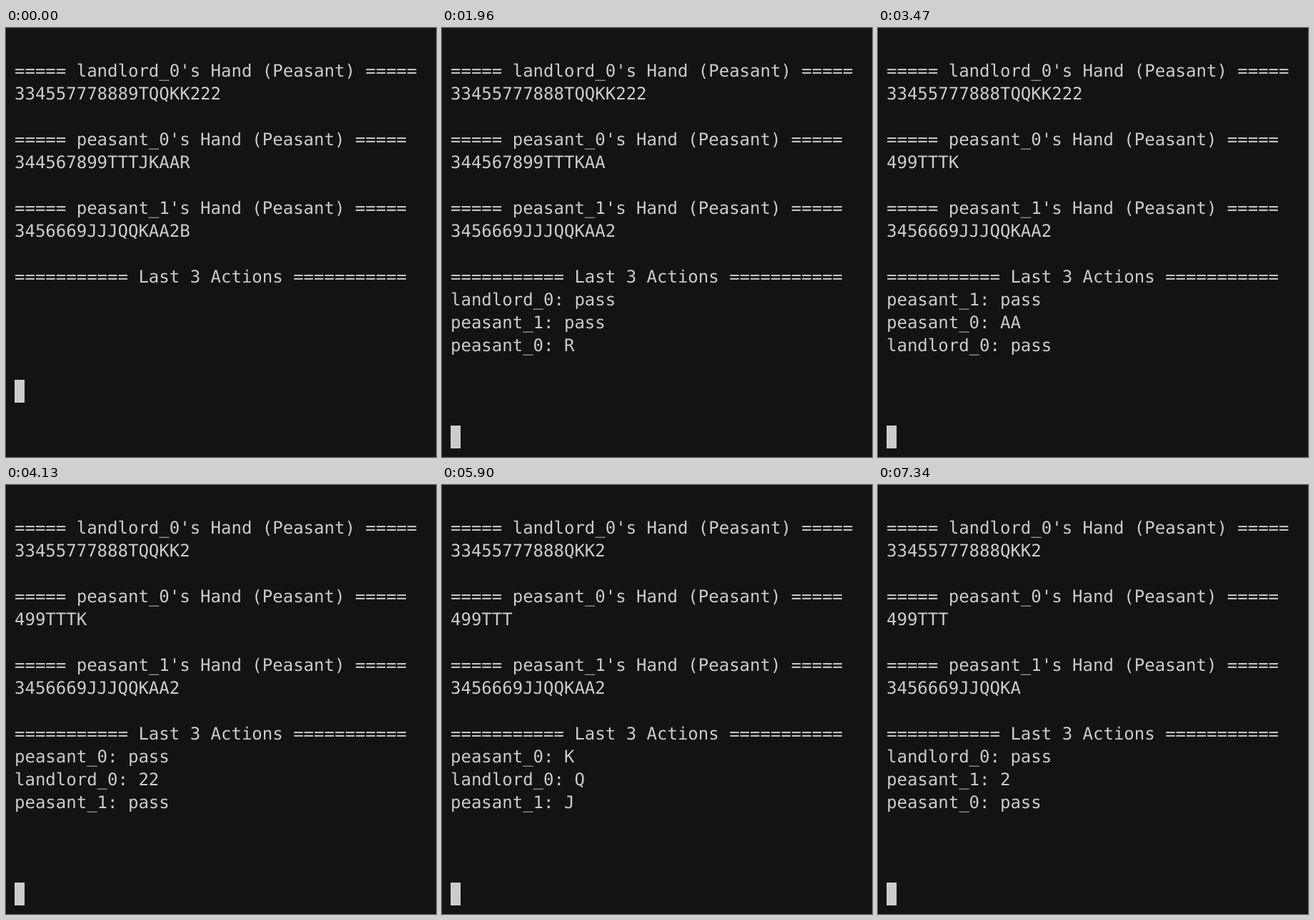
An HTML page for the animation above (8340 ms loop, 602x600 px).

```html
<!DOCTYPE html>
<html lang="en">
<head>
<meta charset="utf-8">
<title>Card game in a terminal</title>
<style>
  html, body {
    margin: 0;
    width: 100%;
    height: 100%;
    overflow: hidden;
    background: #121314;
  }
  #screen {
    position: absolute;
    left: 12px;
    top: 12px;
    margin: 0;
    color: #ccc;
    font: 24px/32px "DejaVu Sans Mono", monospace;
    font-variant-ligatures: none;
    text-rendering: geometricPrecision;
    white-space: pre;
  }
  #cursor {
    position: absolute;
    left: 12px;
    width: 14px;
    height: 32px;
    background: #ccc;
  }
</style>
</head>
<body>
<pre id="screen"></pre>
<div id="cursor"></div>
<script>
  const LOOP = 8340;
  const ROW = 32, PAD = 12, LAST_ROW = 17;

  // Seats in turn order, with the cards dealt to each.
  const seats = ["landlord_0", "peasant_0", "peasant_1"];
  const deal = ["334557778889TQQKK222", "344567899TTTJKAAR", "3456669JJJQQKAA2B"];

  // Start of each turn in ms, and what is played in it.
  const starts = [
    260, 520, 850, 1110, 1440, 1700, 1960, 2290, 2620, 2950, 3210, 3470, 3800,
    4130, 4390, 4650, 4980, 5240, 5570, 5900, 6160, 6420, 6750, 7010, 7340
  ];
  const plays = ("9 J B pass R pass pass 345678 pass pass AA pass 22 " +
    "pass pass T pass J Q K A pass pass 2 pass").split(" ");

  const screen = document.getElementById("screen");
  const cursor = document.getElementById("cursor");

  function handsAfter(turns) {
    const hands = [...deal];
    plays.slice(0, turns).forEach((play, i) => {
      if (play === "pass") return;
      for (const card of play) hands[i % 3] = hands[i % 3].replace(card, "");
    });
    return hands;
  }

  function render(turns) {
    const hands = handsAfter(turns);
    const lines = seats.flatMap((seat, i) =>
      ["", `===== ${seat}'s Hand (Peasant) =====`, hands[i]]);
    lines.push("", "=========== Last 3 Actions ===========");
    // Newest action first.
    for (let i = turns - 1; i >= Math.max(0, turns - 3); i--) {
      lines.push(`${seats[i % 3]}: ${plays[i]}`);
    }
    screen.textContent = lines.join("\n");
    cursor.style.top = PAD + ROW * Math.min(LAST_ROW, 15 + turns) + "px";
  }

  let shown = -1;
  function tick() {
    const t = performance.now() % LOOP;
    const turns = starts.filter(start => start <= t).length;
    if (turns !== shown) render(shown = turns);
    requestAnimationFrame(tick);
  }
  tick();
</script>
</body>
</html>
```
